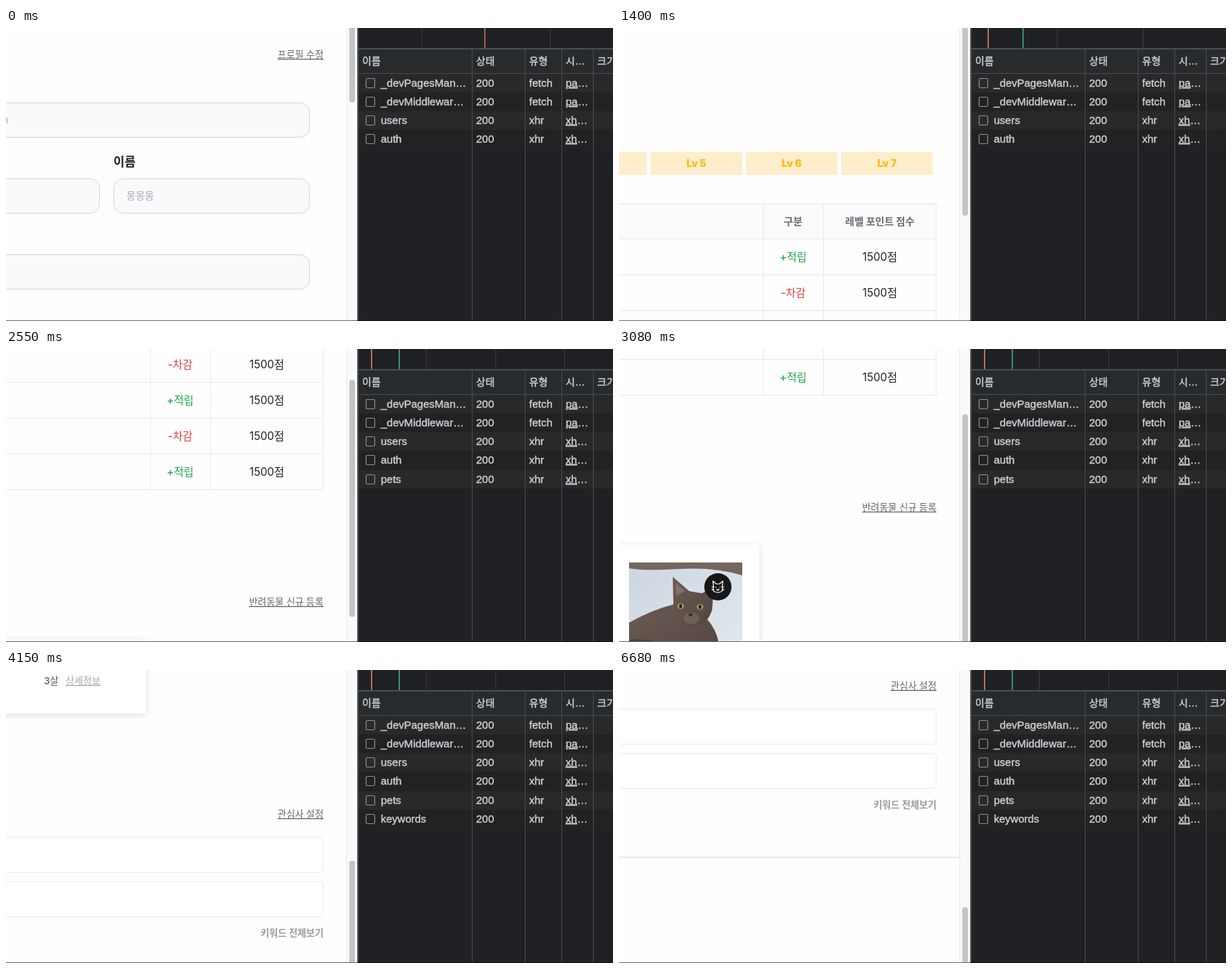
An HTML page for the animation above (7200 ms loop, 847 by 409 pixels).

```html
<!DOCTYPE html>
<html lang="ko">
<head>
<meta charset="utf-8">
<style>
html, body { margin: 0; width: 100%; height: 100%; overflow: hidden; background: #fff; }
svg { display: block; width: 847px; height: 409px; }
text { font-family: Inter, "Noto Sans CJK KR", "Noto Sans CJK", "Noto Sans CJK JP", sans-serif; white-space: pre; }
.dev text { font-family: "Liberation Sans", "Noto Sans CJK KR", "Noto Sans CJK", "Noto Sans CJK JP", sans-serif; fill: #cbd0d5; stroke: #cbd0d5; stroke-width: .4px; }
.link { text-decoration: underline; }
.card { filter: drop-shadow(0 2px 4px rgba(0, 0, 0, .13)); }
</style>
</head>
<body>
<svg id="stage" viewBox="0 0 847 409"></svg>
<script>
const LOOP = 7200;
const TABLE_TOP = 638, TABLE_END = 1037;
const PETS_LOADED = 1830;

// [time in ms, scroll offset in px], linear in between
const SCROLL = [
  [0, 0], [385, 0], [480, 40], [600, 118], [830, 281], [850, 281], [940, 345], [1050, 375],
  [1385, 375], [1450, 455], [1550, 605], [1580, 605], [1650, 693],
  [2100, 693], [2100, 758], [2280, 758], [2280, 807], [2400, 830], [2550, 841],
  [2730, 841], [2730, 852], [2915, 852], [3060, 960], [3180, 1035], [3300, 1065],
  [3700, 1065], [3700, 1080], [3780, 1080], [3870, 1310], [3950, 1453],
  [4150, 1453], [4150, 1460], [4780, 1460], [4780, 1500], [4850, 1632],
  [5150, 1632], [5150, 1639], [LOOP, 1639]
];

const rect = (x, y, w, h, fill, more = '') =>
  `<rect x="${x}" y="${y}" width="${w}" height="${h}" fill="${fill}" ${more}/>`;
const ellipse = (x, y, rx, ry, fill) =>
  `<ellipse cx="${x}" cy="${y}" rx="${rx}" ry="${ry}" fill="${fill}"/>`;
const path = (d, fill, more = '') => `<path d="${d}" fill="${fill}" ${more}/>`;
const gradient = (id, from, to) =>
  `<linearGradient id="${id}" x2="1" y2="1"><stop stop-color="${from}"/><stop offset="1" stop-color="${to}"/></linearGradient>`;

// y is the optical middle of the line
const text = (x, y, size, content, fill, more = '') =>
  `<text x="${x}" y="${y + size * .37}" font-size="${size}" fill="${fill}" ${more}>${content}</text>`;
const centered = (x, y, size, content, fill, weight = 400) =>
  text(x, y, size, content, fill, `text-anchor="middle" font-weight="${weight}"`);
const rightLink = (y, content) =>
  text(443, y, 13.15, content, '#63666d', 'text-anchor="end" class="link" font-weight="500"');

const field = (x, y, right) =>
  rect(x + .5, y + .5, right - x - 1, 48, '#f9fafc', 'rx="13" stroke="#d0d4dd"');
const keywordBox = y => rect(-20, y + .5, 462.5, 49, '#fff', 'rx="4" stroke="#ebebef"');

function profile() {
  return rightLink(37, '프로필 수정') +
    field(-60, 104, 424) + text(3, 128, 14, 'm', '#a6aab3', 'text-anchor="end"') +
    text(150, 187, 16.8, '이름', '#222', 'font-weight="700"') +
    field(-60, 210, 131) + field(150, 210, 424) + text(168, 234, 14, '몽몽몽', '#a6aab3') +
    field(-60, 316, 424);
}

function levels() {
  return [4, 5, 6, 7].map(n => {
    const x = 44 + (n - 5) * 133;
    return rect(x, 566, 128, 32, '#ffeecb') + centered(x + 64, 582, 14, 'Lv ' + n, '#fcbb22', 900);
  }).join('');
}

function pointTable() {
  const line = '#e9e9ec';
  let out = rect(0, TABLE_TOP, 442, 49, '#fbfbfc') + rect(0, TABLE_TOP, 443, 1, line) +
    centered(243, 663, 14.2, '구분', '#696d76', 700) +
    centered(364, 663, 14, '레벨 포인트 점수', '#696d76', 700);
  for (let i = 0; i < 7; i++) {
    const y = 712 + i * 50;
    out += rect(0, y - 25, 443, 1, line) +
      (i % 2 ? centered(243, y, 15, '-차감', '#dc413c', 500) : centered(243, y, 15, '+적립', '#24a44f', 500)) +
      centered(364, y, 15.2, '1500점', '#202124');
  }
  out += rect(0, TABLE_END, 443, 1, line);
  return out + [201, 285, 442].map(x => rect(x, TABLE_TOP, 1, TABLE_END - TABLE_TOP, line)).join('');
}

function petPhoto() {
  const fur = 'url(#fur)';
  return gradient('couch', '#cdd6e1', '#e3e9ef') + gradient('fur', '#6b5a54', '#51443f') +
    `<svg x="14" y="1271" width="158" height="158">` +
    rect(0, 0, 158, 158, 'url(#couch)') +
    path('M0 0H158V18Q120 6 70 9T0 8Z', '#75665f') +
    path('M0 132Q60 122 158 118V158H0Z', '#c6d8e8') +
    path('M112 132L158 124V138L124 144Z', '#e9cdb0') + path('M44 158Q64 146 92 158Z', '#e6dfbd') +
    path('M0 84Q32 66 64 58L108 78Q128 100 126 130 112 148 82 142L36 150Q14 154 0 146Z', fur) +
    path('M0 108Q38 104 66 124L60 138Q30 130 0 134Z', '#4c3f3a') +
    path('M62 60L61 20 84 40 102 43 118 33 116 66Q108 90 88 90 66 84 62 60Z', fur) +
    path('M66 46L65 28 78 40Z', '#83706a') +
    ellipse(82, 136, 14, 10, '#6b5d57') + ellipse(108, 132, 13, 9, '#665852') +
    ellipse(87, 78, 11, 8, '#6e6059') + ellipse(86, 73, 3, 2, '#372f2e') +
    [[72, 61], [99, 62]].map(([x, y]) => ellipse(x, y, 4.5, 4, '#a99c66') + ellipse(x, y, 2, 3, '#222')).join('') +
    `</svg>` +
    ellipse(138, 1305, 19, 19, '#171717') +
    path('M131 1297L132 1305Q129 1312 138 1313 147 1312 144 1305L145 1297 140 1301H136ZM129 1305H133M129 1309H133M143 1305H147M143 1309H147M136 1308L138 1310 140 1308M135 1305V1306M141 1305V1306',
      'none', 'stroke="#fff" stroke-width="1.2" stroke-linejoin="round"');
}

function pets() {
  return rightLink(1194, '반려동물 신규 등록') +
    rect(-60, 1246, 256, 275, '#fff', 'class="card"') + petPhoto() +
    centered(92, 1451, 17, '보들솜뭉치', '#202124', 700) +
    text(53, 1475, 13.2, '3살', '#55585e', 'font-weight="500"') +
    text(83, 1475, 13.3, '상세정보', '#a5a8ae', 'class="link" font-weight="500"');
}

function interests() {
  return rightLink(1661, '관심사 설정') + keywordBox(1693) + keywordBox(1755) +
    text(443, 1827, 13.15, '키워드 전체보기', '#9b9b9d', 'text-anchor="end" font-weight="700"') +
    rect(0, 1899, 475, 1, '#f1f1f1') + rect(0, 1900, 475, 1, '#ebebec') + rect(0, 1901, 475, 1, '#f3f3f3');
}

const REQUESTS = [
  ['_devPagesMan…', 'fetch', 'pa', 0], ['_devMiddlewar…', 'fetch', 'pa', 0],
  ['users', 'xhr', 'xh', 0], ['auth', 'xhr', 'xh', 0],
  ['pets', 'xhr', 'xh', 1610], ['keywords', 'xhr', 'xh', 3100]
];
const ORANGE = '#e58b62', TEAL = '#3fae9f', GRAY = '#3b3c3f';
const TIMELINES = [
  { from: 0, to: 1400, marks: [[580, GRAY], [667.5, '#d4714f'], [759, GRAY]] },
  { from: 1400, to: PETS_LOADED, marks: [[514.5, ORANGE], [563, TEAL], [611, GRAY], [731, GRAY]] },
  { from: PETS_LOADED, to: LOOP, marks: [[509.5, ORANGE], [548, TEAL], [586, GRAY], [683, GRAY], [779, GRAY]] }
];
const timed = (from, to, content) => `<g data-from="${from}" data-to="${to}">${content}</g>`;

function requestRow([name, type, initiator, from], i) {
  const y = Math.floor(77 + i * 26.25), textY = y - .8;
  return timed(from, LOOP,
    rect(492, y - 13, 355, 26, i % 2 ? '#222222' : '#292929') +
    rect(502.5, y - 6.5, 12, 13, 'none', 'rx="1.5" stroke="#8b8f94" stroke-width="1.2"') +
    text(523, textY, 15, name) + text(656, textY, 15, '200') + text(730, textY, 15, type) +
    text(781, textY, 15, `<tspan class="link">${initiator}</tspan>…`));
}

function devtools() {
  const line = '#494c50';
  const titles = [[497, '이름'], [656, '상태'], [730, '유형'], [781, '시…'], [825, '크기']];
  return rect(490, 0, 357, 409, '#202124') +
    TIMELINES.map(({ from, to, marks }) => timed(from, to,
      marks.map(([x, color]) => rect(x, 0, color === GRAY ? 1 : 1.5, 28, color)).join(''))).join('') +
    rect(490, 28, 357, 2, line) + rect(492, 30, 355, 33, '#282b2e') +
    titles.map(([x, title]) => text(x, 45.5, 14, title)).join('') +
    rect(492, 63, 355, 1, line) +
    REQUESTS.map(requestRow).join('') +
    [650, 724, 775, 819].map(x => rect(x, 30, 1, 378, line)).join('') +
    rect(490, 0, 2, 409, '#505256');
}

const stage = document.getElementById('stage');
stage.innerHTML = rect(0, 0, 847, 409, '#fefefe') +
  `<g id="page">${profile() + levels() + pointTable() + pets() + interests()}</g>` +
  rect(475, 0, 15, 409, '#fafafa') + rect(475, 0, 1, 409, '#e8e8e8') +
  rect(479, 0, 8, 368, '#c4c4c4', 'id="thumb" rx="4"') +
  `<g class="dev">${devtools()}</g>` +
  rect(0, 408, 490, 1, '#75696f') + rect(490, 408, 357, 1, '#17111a');

const page = document.getElementById('page');
const thumb = document.getElementById('thumb');
const timedGroups = [...stage.querySelectorAll('[data-from]')];

function scrollAt(t) {
  const next = SCROLL.findIndex(([time]) => time > t);
  const [t0, s0] = SCROLL[next - 1], [t1, s1] = SCROLL[next];
  return Math.round(s0 + (s1 - s0) * (t - t0) / (t1 - t0));
}

function draw(now) {
  const t = now % LOOP;
  const scroll = scrollAt(t);
  const grown = t >= PETS_LOADED;
  page.setAttribute('transform', `translate(0 ${-scroll})`);
  thumb.setAttribute('y', Math.round(grown ? 43 + (scroll - 841) * .361 : -264 + scroll * .4015));
  thumb.setAttribute('height', grown ? 331 : 368);
  for (const group of timedGroups) {
    const { from, to } = group.dataset;
    group.style.display = t >= +from && t < +to ? '' : 'none';
  }
}

let start;
function tick(now) {
  start ??= now;
  draw(Math.max(0, now - start));
  requestAnimationFrame(tick);
}
draw(0);
requestAnimationFrame(tick);
</script>
</body>
</html>
```
